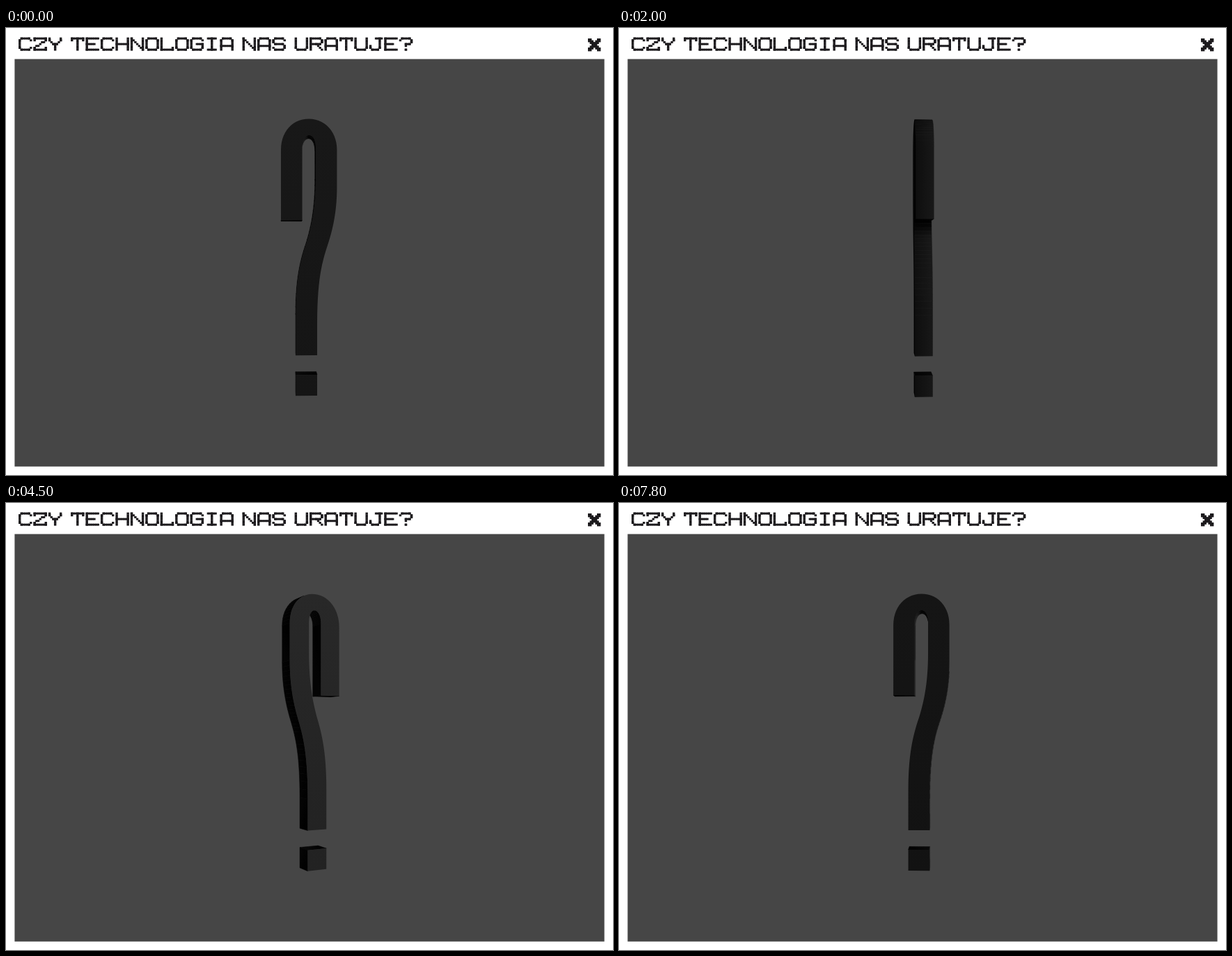
Write an HTML page with a canvas that moves like this. It is 872x642 px and loops after 7.9 s.

```html
<!DOCTYPE html>
<html lang="pl">
<head>
<meta charset="utf-8">
<title>Czy technologia nas uratuje?</title>
<style>
html, body { margin: 0; width: 100%; height: 100%; overflow: hidden; background: #fff; }
canvas { position: absolute; left: 0; top: 0; }
/* The lettering is painted on the canvas; this keeps the title readable as text. */
h1 { position: absolute; left: 18px; top: 12px; margin: 0; color: transparent;
     font: 20px/22px "DejaVu Sans Mono", monospace; white-space: nowrap; }
</style>
</head>
<body>
<canvas id="stage" width="872" height="642"></canvas>
<h1>CZY TECHNOLOGIA NAS URATUJE?</h1>
<script>
const ctx = document.getElementById('stage').getContext('2d');
const STEP = 100, STEPS = 79;
const AXIS = 436.5, HORIZON = 334, CAMERA = 890, HALF = 12.5;
const FACE_X = 437, FACE_SCALE = 1.014;
const LIGHT = [Math.sin(1.1), -0.12, Math.cos(1.1)], POWER = 47;

// Pen strokes on a 7 x 7 grid, each point written as column and row.
const GLYPHS = {
  C: '61 50 10 01 05 16 56 65',
  Z: '01 00 60 61 05 06 66 65',
  Y: '00 01 23 43 61 60,33 36',
  T: '01 00 60 61,30 36',
  E: '60 00 06 66,03 43',
  H: '00 06,60 66,03 63',
  N: '06 00 66 60',
  O: '10 50 61 65 56 16 05 01 10',
  L: '00 06 66 65',
  G: '61 50 10 01 05 16 56 65 63 33',
  I: '10 50,30 36,16 56',
  A: '06 01 10 50 61 66,04 64',
  S: '61 50 10 01 02 13 53 64 65 56 16 05',
  U: '00 05 16 56 65 60',
  R: '06 00 50 61 62 53 03,33 66',
  J: '30 60,50 55 46 16 05 04',
  '?': '01 10 50 61 62 53 33 34,36 36'
};

const clamp = v => Math.max(0, Math.min(1, v));
const gray = v => { const g = Math.round(Math.max(1, v)); return `rgb(${g},${g},${g})`; };

function drawStrokes(strokes, x, y, cell, w, h) {
  for (const stroke of strokes.split(',')) {
    const pts = stroke.split(' ').map(p => [+p[0], +p[1]]);
    for (let i = 1; i < pts.length; i++) {
      const [ax, ay] = pts[i - 1], [bx, by] = pts[i];
      const n = Math.max(Math.abs(bx - ax), Math.abs(by - ay), 1);
      for (let k = 0; k <= n; k++) {
        const col = Math.round(ax + (bx - ax) * k / n);
        const row = Math.round(ay + (by - ay) * k / n);
        ctx.fillRect(x + col * cell, y + row * cell, w, h);
      }
    }
  }
}

function drawWindow() {
  ctx.fillStyle = '#fff';
  ctx.fillRect(0, 0, 872, 642);
  ctx.fillStyle = '#464646';
  ctx.fillRect(12.4, 44.6, 847.2, 585.2);
  ctx.fillStyle = '#1c1a1d';
  let x = 18;
  const cell = 2.68;
  for (const ch of document.querySelector('h1').textContent) {
    if (GLYPHS[ch]) drawStrokes(GLYPHS[ch], x, 13.6, cell, 3.4, 2.9);
    x += cell * (ch === ' ' ? 4 : 8);
  }
  drawStrokes('00 55,50 05', 836, 15, 2.6, 5.4, 5.4);
}

// Outline of the front face as seen head-on: lines are [x, y], curves have three points.
function outline(parts) {
  const pts = [];
  let x0, y0;
  for (const p of parts) {
    if (p.length === 6) {
      const [x1, y1, x2, y2, x3, y3] = p, n = 14;
      for (let i = 1; i <= n; i++) {
        const t = i / n, u = 1 - t;
        const mix = (a, b, c, d) => u * u * u * a + 3 * u * u * t * b + 3 * u * t * t * c + t * t * t * d;
        pts.push([mix(x0, x1, x2, x3), mix(y0, y1, y2, y3)]);
      }
    } else pts.push(p);
    [x0, y0] = p.slice(-2);
  }
  return pts;
}

const HOOK = outline([
  [395, 276], [395, 175],
  [395, 149, 412, 130.5, 435.3, 130.5], [458.5, 130.5, 475.5, 149, 475.5, 175],
  [475.5, 228],
  [475.5, 262, 470, 288, 462, 312], [454, 336, 447, 362, 447, 425],
  [447, 470], [416.5, 470], [416.5, 412],
  [416.5, 362, 423, 334, 432, 308], [440, 282, 445, 255, 445, 215],
  [445, 172],
  [445, 161, 441, 154, 435.5, 154], [430, 154, 425.5, 161, 425.5, 172],
  [425.5, 276]
]);
const DOT = outline([[416.5, 528], [416.5, 498], [447, 498], [447, 528]]);

const toModel = ([x, y]) => [(x - FACE_X) / FACE_SCALE, (y - HORIZON) / FACE_SCALE];
const shapes = [HOOK, DOT].map(s => s.map(toModel));

// Walls hold their end points, outward normal and position on the face.
const walls = [HOOK, DOT].flatMap(face => face.map((a, i) => {
  const b = face[(i + 1) % face.length];
  const dx = b[0] - a[0], dy = b[1] - a[1], len = Math.hypot(dx, dy);
  const mx = (a[0] + b[0]) / 2, my = (a[1] + b[1]) / 2;
  return { a: toModel(a), b: toModel(b), nx: dy / len, ny: -dx / len,
           my, inner: mx > 420 && mx < 446 && my < 300 };
}));

function drawMark(angle) {
  const c = Math.cos(angle), s = Math.sin(angle);
  const project = ([x, y], z) => {
    const k = CAMERA / (CAMERA + x * s - z * c);
    return [AXIS + k * (x * c + z * s), HORIZON + k * y];
  };
  const trace = pts => {
    ctx.beginPath();
    pts.forEach(p => ctx.lineTo(p[0], p[1]));
    ctx.closePath();
  };
  const lit = (x, y, z) => Math.max(0, x * LIGHT[0] + y * LIGHT[1] + z * LIGHT[2]);

  const side = c >= 0 ? 1 : -1;
  const near = HALF * side;
  const faceLit = lit(s * side, 0, c * side);
  const depth = w => -(w.a[0] + w.b[0]) * s;

  const visible = walls.filter(({ a, nx, ny }) =>
    nx * c * -(a[0] * c) - ny * a[1] - nx * s * (CAMERA + a[0] * s) > 0);
  visible.sort((p, q) => depth(p) - depth(q));

  ctx.lineWidth = 0.5;
  ctx.lineJoin = 'round';
  for (const { a, b, nx, ny, my, inner } of visible) {
    const open = inner ? Math.max(clamp(faceLit * 3), clamp((my - 276) / 24)) : 1;
    const v = POWER * lit(nx * c, ny, -nx * s) * open;
    const quad = [project(a, near), project(b, near), project(b, -near), project(a, -near)];
    const mid = (p, q) => [(p[0] + q[0]) / 2, (p[1] + q[1]) / 2];
    const fill = ctx.createLinearGradient(...mid(quad[0], quad[1]), ...mid(quad[2], quad[3]));
    fill.addColorStop(0, gray(v * 0.6));
    fill.addColorStop(1, gray(v * 0.85 + 4 * open));
    ctx.fillStyle = ctx.strokeStyle = fill;
    trace(quad);
    ctx.fill();
    ctx.stroke();
  }

  // The cap facing the camera is never covered by a wall.
  if (Math.abs(c) * CAMERA > HALF) {
    const fill = ctx.createLinearGradient(0, 130, 0, 530);
    fill.addColorStop(0, gray(POWER * faceLit * 1.05));
    fill.addColorStop(1, gray(POWER * faceLit * 0.9));
    ctx.fillStyle = fill;
    for (const shape of shapes) {
      trace(shape.map(p => project(p, near)));
      ctx.fill();
    }
  }
}

const start = performance.now();
function tick() {
  const n = Math.floor(Math.max(0, performance.now() - start) / STEP) % STEPS;
  drawWindow();
  drawMark(0.042 + n * 2 * Math.PI / STEPS);
  requestAnimationFrame(tick);
}
tick();
</script>
</body>
</html>
```
